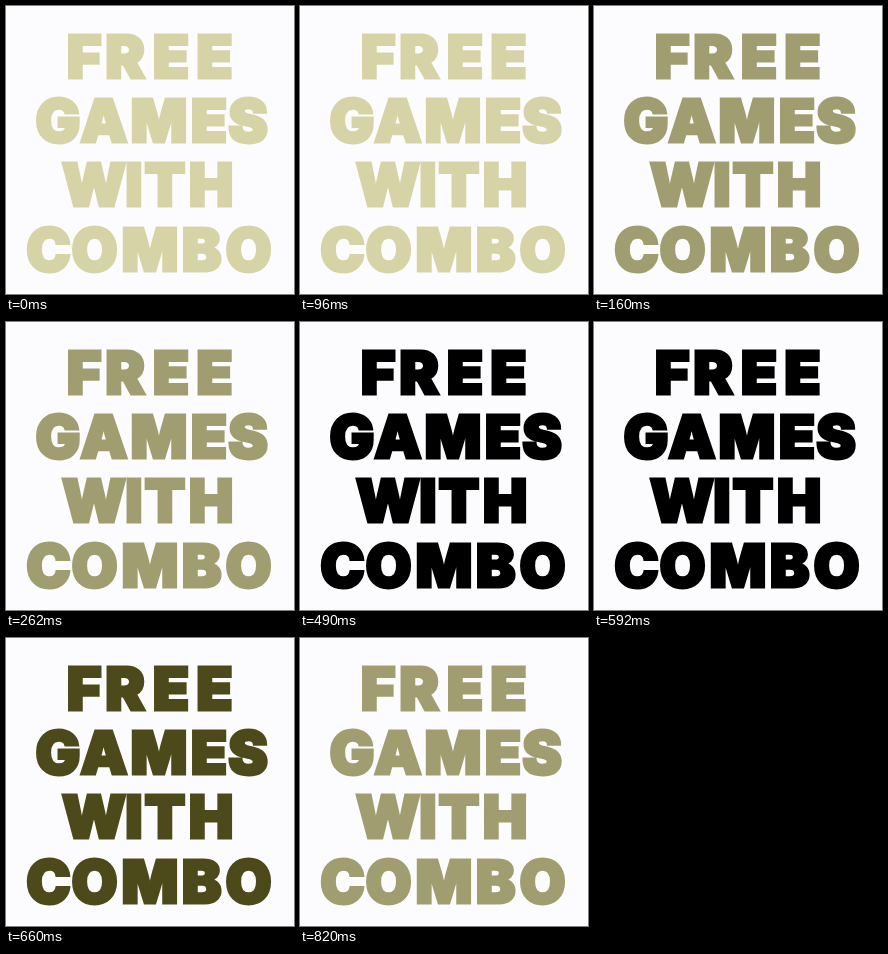
Recreate the animation shown at these times as an HTML page. Size 288x288 px, loop 980 ms.

```html
<!DOCTYPE html>
<html lang="en">
<head>
<meta charset="utf-8">
<title>Free games with combo</title>
<style>
  html, body { margin: 0; height: 100%; overflow: hidden; background: #fcfcfe; }
  svg { display: block; width: 100%; height: 100%; }
  text {
    font: 900 59.5px Inter, "Open Sans", sans-serif;
    text-anchor: middle;
    stroke-width: 3;
    stroke-linejoin: miter;
    stroke-miterlimit: 3;
  }
</style>
</head>
<body>
<svg viewBox="0 0 288 288">
  <!-- each x list holds the letter centres -->
  <g id="lettering">
    <text y="71.5" x="78 119 165 208.5">FREE</text>
    <text y="136" x="52 98 153 203 242">GAMES</text>
    <text y="200" x="88 128 159 205">WITH</text>
    <text y="264.5" x="42.5 88.5 144 195.5 242.5">COMBO</text>
  </g>
</svg>
<script>
  const lettering = document.getElementById('lettering');
  const LOOP = 980;
  const pale = '#d6d4a6', khaki = '#a09e70', olive = '#4c4a1a', black = '#000';
  const steps = [
    [0, pale], [160, khaki], [330, olive],
    [490, black], [660, olive], [820, khaki]
  ];

  function draw() {
    const time = performance.now() % LOOP;
    const [, color] = steps.findLast(([from]) => time >= from);
    lettering.setAttribute('fill', color);
    lettering.setAttribute('stroke', color);
    requestAnimationFrame(draw);
  }
  draw();
</script>
</body>
</html>
```
